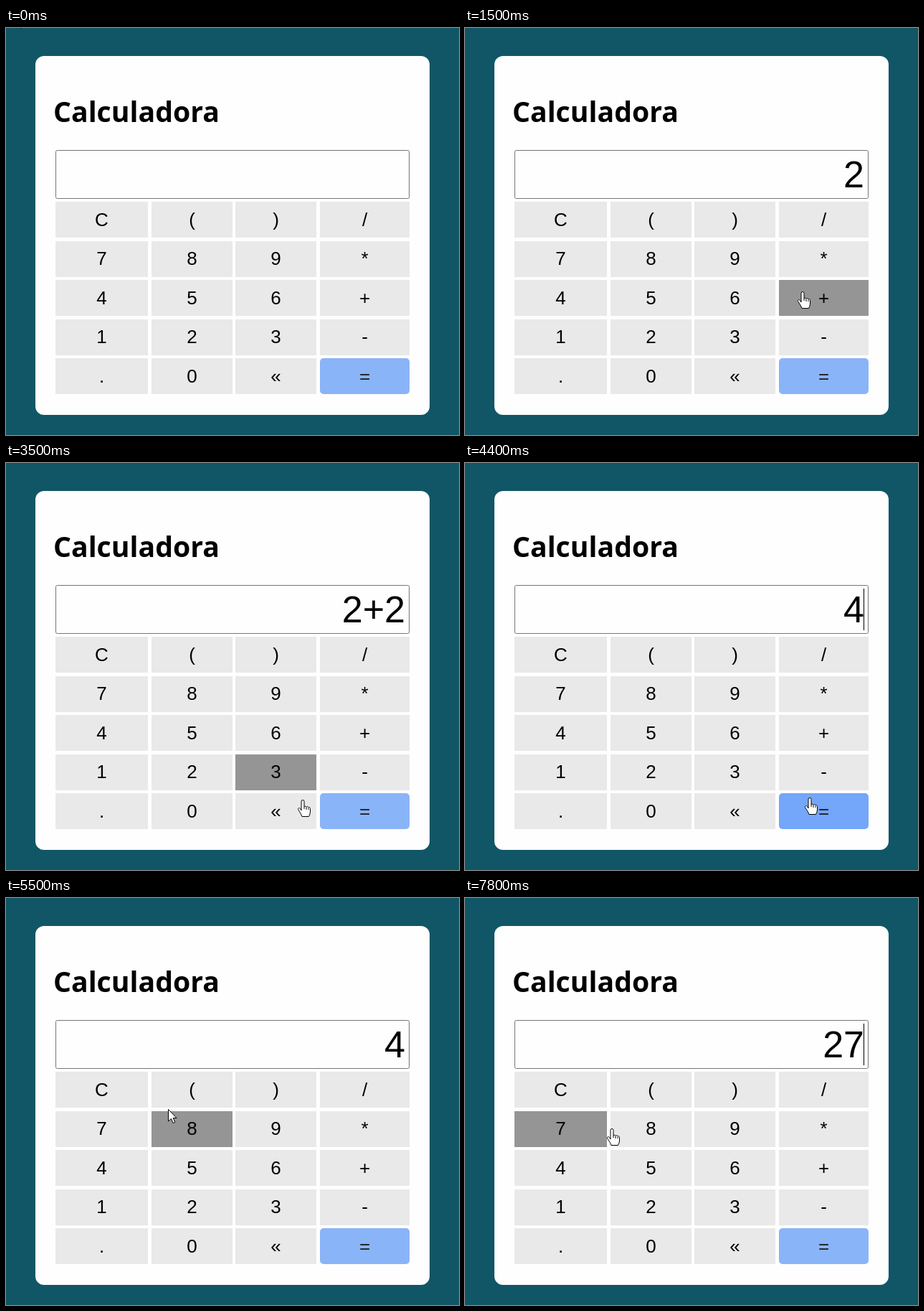
An HTML page that plays this animation: 632 by 567 pixels, repeating every 8 s.

```html
<!DOCTYPE html>
<html lang="es">
<head>
<meta charset="utf-8">
<title>Calculadora</title>
<style>
html, body { margin: 0; width: 100%; height: 100%; overflow: hidden; background: #115666; }
svg { display: block; }
.title { font: bold 39.2px "Open Sans", sans-serif; }
.key { font: 26px "Liberation Sans", Arial, sans-serif; text-anchor: middle; }
#screen { font: 52px "Liberation Sans", Arial, sans-serif; text-anchor: end; }
.cursor { fill: #fff; stroke: #000; stroke-linejoin: round; }
</style>
</head>
<body>
<svg width="632" height="567" viewBox="0 0 632 567">
  <rect width="632" height="567" fill="#115666"/>
  <rect x="41" y="39" width="550" height="500" rx="12" fill="#fefefe"/>
  <text class="title" x="66" y="131">Calculadora</text>
  <rect x="69.5" y="170.5" width="493" height="67" rx="2" fill="#fefefe" stroke="#767676"/>
  <text id="screen" x="557" y="222"></text>
  <rect id="caret" y="175" width="1" height="58"/>
  <g id="keys"></g>
  <path id="arrow" class="cursor" d="M.5 .5V17l4-3.5 2.7 6 2.6-1.1-2.6-5.9H12z"/>
  <g id="hand" class="cursor">
    <path d="M-1 15V2.5a2 2 0 0 1 4 0V10a1.6 1.6 0 0 1 3 .5a1.6 1.6 0 0 1 3 .7a1.5 1.5 0 0 1 2.5 1.3V17q0 3-2 6.5H0Q-1 20-5 14.5c-1.5-2.5 1-4 2.5-2z"/>
    <path d="M3 10v3M6 11v3M9 12v2" fill="none"/>
  </g>
</svg>
<script>
const LOOP = 8000, STEP = 100, BLINK = 500;
const $ = id => document.getElementById(id);

const columns = [[69, 198], [203, 316], [320, 433], [438, 563]];
const labels = ["C()/", "789*", "456+", "123-", ".0«="];

// pointer moves: start, end, x, y
const home = [13, -19];
const moves = [
  [100, 400, 369, 150], [400, 500, 259, 420],
  [1000, 1200, 468, 367], [1400, 1800, 482, 369],
  [1900, 2200, 133, 403], [2200, 2400, 278, 425],
  [2800, 3400, 390, 440], [3400, 3500, 413, 469], [3500, 3800, 487, 476],
  [4300, 4900, 397, 347], [5200, 5700, 133, 265],
  [6000, 6200, 229, 408], [6200, 6800, 256, 432],
  [7100, 7500, 164, 311], [7600, 7800, 204, 321]
];
const clicks = [[1000, "2"], [1700, "+"], [2700, "2"], [4000, "="],
  [5900, "C"], [7100, "2"], [7700, "7"]];

function add(tag, attrs) {
  const node = document.createElementNS("http://www.w3.org/2000/svg", tag);
  for (const name in attrs) node.setAttribute(name, attrs[name]);
  return $("keys").appendChild(node);
}

const keys = labels.flatMap((row, r) => [...row].map((label, c) => {
  const [left, right] = columns[c], offset = 54.5 * r;
  const top = Math.round(242 + offset), equals = label === "=";
  const box = add("rect", { x: left, y: top, width: right - left, height: 50, rx: equals ? 5 : 0 });
  add("text", {
    class: "key", x: (left + right) / 2, y: Math.round(275.5 + offset),
    fill: equals ? "#202124" : "#000"
  }).textContent = label;
  const [fill, hover] = equals ? ["#8ab4f8", "#74a6f9"] : ["#e9e9e9", "#959595"];
  return { left, right, top, box, fill, hover };
}));

function pointerAt(t) {
  let [x, y] = home;
  for (const [from, to, endX, endY] of moves) {
    const u = Math.min(1, Math.max(0, (t - from) / (to - from)));
    const eased = u * u * (3 - 2 * u);
    x += (endX - x) * eased;
    y += (endY - y) * eased;
  }
  return [Math.round(x), Math.round(y)];
}

const keyAt = ([x, y]) =>
  keys.find(k => x >= k.left && x < k.right && y >= k.top && y < k.top + 50);

function press(value, key) {
  if (key === "C") return "";
  if (key === "=") return String(value.split("+").reduce((sum, n) => sum + Number(n), 0));
  return value + key;
}

const show = (node, on) => node.setAttribute("visibility", on ? "visible" : "hidden");

function draw(t) {
  const pos = pointerAt(t), over = keyAt(pos);
  const lit = keyAt(pointerAt(t - STEP)); // highlight trails the pointer by one step
  for (const k of keys) k.box.setAttribute("fill", k === lit ? k.hover : k.fill);

  for (const id of ["arrow", "hand"]) $(id).setAttribute("transform", `translate(${pos})`);
  show($("arrow"), !over);
  show($("hand"), over);

  const done = clicks.filter(c => c[0] <= t);
  const value = done.reduce((v, c) => press(v, c[1]), "");
  $("screen").textContent = value;
  $("caret").setAttribute("x", value ? 556 : 557);
  show($("caret"), done.length && (t - done[done.length - 1][0]) % (2 * BLINK) < BLINK);
}

const start = performance.now();
function tick() {
  const t = (performance.now() - start) % LOOP;
  draw(Math.floor(t / STEP) * STEP);
  requestAnimationFrame(tick);
}
tick();
</script>
</body>
</html>
```
